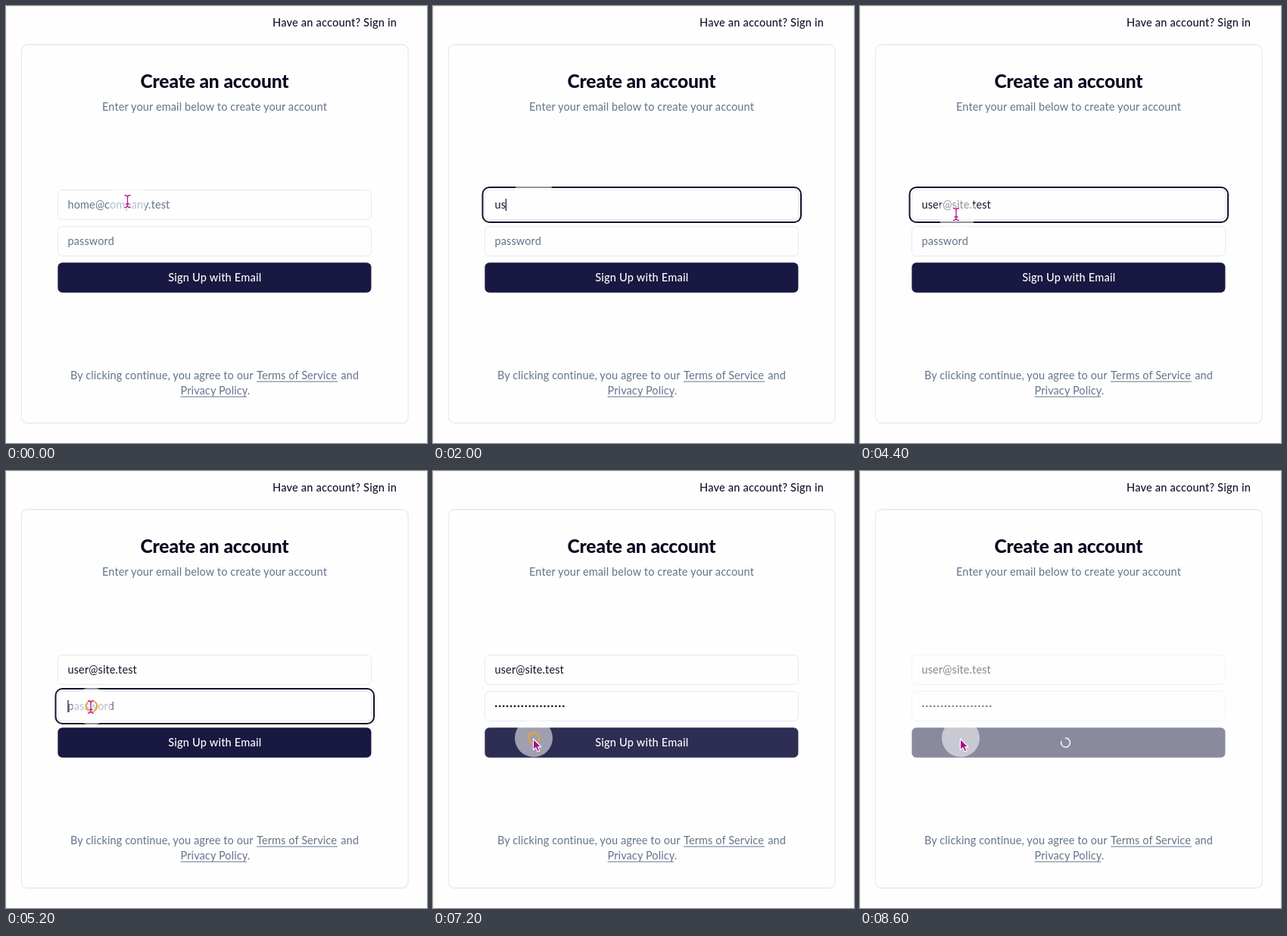
An HTML page that plays this animation: 556 by 576 pixels, repeating every 8.8 s.

```html
<!DOCTYPE html>
<html lang="en">
<head>
<meta charset="utf-8">
<title>Create an account</title>
<style>
  html, body { margin: 0; width: 100%; height: 100%; overflow: hidden; background: #fefefe; }
  svg { display: block; width: 556px; height: 576px; }
  text { font: 14.5px Lato, "Open Sans", sans-serif; letter-spacing: .12px; fill: #11142c; white-space: pre; }
  .title { font-size: 24.5px; font-weight: 800; letter-spacing: -.1px; fill: #060820; }
  .medium { font-weight: 500; letter-spacing: .22px; }
  .muted text, text.muted { fill: #64748b; }
  .legal text { letter-spacing: .1px; }
  .legal path { stroke: #64748b; }
  .mid { text-anchor: middle; }
  .box { fill: none; stroke: #e4e8f1; }
  .line { fill: none; stroke-linecap: round; stroke-linejoin: round; }
</style>
</head>
<body>
<svg viewBox="0 0 556 576">
  <rect width="556" height="576" fill="#fefefe"/>
  <path d="M.5 576V.5H556" fill="none" stroke="#fcefe7"/>
  <path d="M555.5 0V576" stroke="#f6f4f3"/>
  <text class="medium" x="516" y="26.5" text-anchor="end">Have an account? Sign in</text>

  <rect x="20.5" y="51.5" width="511" height="499" rx="8" fill="none" stroke="#f3f4f7"/>
  <rect class="box" x="20.5" y="50.5" width="510.5" height="499" rx="8"/>
  <text class="title mid" x="275.5" y="108">Create an account</text>
  <text class="muted mid" x="275.5" y="137.5">Enter your email below to create your account</text>

  <g id="fields">
    <rect class="box" x="68.5" y="242.5" width="414" height="39" rx="6"/>
    <rect class="box" x="68.5" y="290.5" width="414" height="39" rx="6"/>
    <text id="email" x="81.5" y="267"></text>
    <text id="hint" class="muted" x="81.5" y="315">password</text>
    <g id="dots" fill="#11142c"></g>
  </g>
  <rect id="focus" x="65.5" width="420.5" height="46" rx="9" fill="none" stroke="#11142b" stroke-width="2"/>
  <path id="caret" d="M0 -8V8" stroke="#11142c" stroke-width="1.2"/>

  <rect id="button" x="68.4" y="338.2" width="414" height="39.6" rx="6" fill="#181842"/>
  <text id="label" class="medium mid" x="275.8" y="362.5" style="fill:#fff">Sign Up with Email</text>
  <path id="spinner" class="line" d="M6 0A6 6 0 1 1 1.85 -5.7" stroke="#fff" stroke-width="1.4"/>

  <g class="muted legal">
    <text x="85" y="492">By clicking continue, you agree to our</text>
    <text x="331" y="492">Terms of Service</text>
    <text x="466" y="492" text-anchor="end">and</text>
    <text x="230.5" y="511.5">Privacy Policy.</text>
    <path d="M331 495H438M230.5 515H318"/>
  </g>

  <g id="mouse">
    <circle r="25" fill="#fff" opacity=".54"/>
    <circle id="click" r="7.3" fill="none" stroke="#f0a22c" stroke-width="2"/>
    <g id="beam" class="line" transform="translate(-1 1)">
      <path d="M-3.5 -8Q0 -8 0 -5Q0 -8 3.5 -8M0 -5V5M-3.5 8Q0 8 0 5Q0 8 3.5 8M-2 3.5H2" stroke="#fff" stroke-width="3" opacity=".8"/>
      <path d="M-3.5 -8Q0 -8 0 -5Q0 -8 3.5 -8M0 -5V5M-3.5 8Q0 8 0 5Q0 8 3.5 8M-2 3.5H2" stroke="#b3158f" stroke-width="1.3"/>
    </g>
    <path id="arrow" d="M0 0V15.5L3.5 12.3L6 18L8.8 16.8L6.4 11.2H11Z" transform="translate(-.5 1) scale(.95)" fill="#a80f86" stroke="#fff" stroke-width="1.2" stroke-linejoin="round"/>
  </g>
</svg>
<script>
const LOOP = 8800, TICK = 200;
const ADDRESS = 'user@site.test', PLACEHOLDER = 'home@company.test';

// [time, characters typed]
const EMAIL = [[0, 0], [1600, 1], [2000, 2], [2200, 3], [2400, 4], [2800, 6], [3000, 8], [3200, 9], [3600, 11], [3800, 14]];
const SECRET = [[0, 0], [5600, 2], [5800, 6], [6000, 11], [6200, 16], [6400, 19]];
// [time, x, y]
const PATH = [
  [0, 161.5, 256.5], [200, 149, 252], [400, 138, 248], [600, 133, 246], [4200, 133, 246],
  [4400, 128, 273.5], [4600, 123, 291], [4800, 117, 303], [5000, 113.5, 309], [5200, 113, 310],
  [6200, 113, 310], [6400, 127.5, 328.5], [6600, 127.5, 328.5], [6800, 131, 342], [7000, 133, 352]
];

const $ = id => document.getElementById(id);
const show = (id, on) => $(id).setAttribute('visibility', on ? 'visible' : 'hidden');
const within = (t, from, to) => t >= from && t < to;
const latest = (steps, t) => steps.filter(s => s[0] <= t).pop();

function position(t) {
  const a = latest(PATH, t);
  const b = PATH[PATH.indexOf(a) + 1] || a;
  const k = a === b ? 0 : (t - a[0]) / (b[0] - a[0]);
  return [a[1] + (b[1] - a[1]) * k, a[2] + (b[2] - a[2]) * k];
}

const dots = Array.from({ length: 19 }, (_, i) => {
  const dot = document.createElementNS('http://www.w3.org/2000/svg', 'circle');
  dot.setAttribute('cx', 83.3 + 4.94 * i);
  dot.setAttribute('cy', 310);
  dot.setAttribute('r', 1.35);
  return $('dots').appendChild(dot);
});

function render(t) {
  const typed = latest(EMAIL, t)[1], secret = latest(SECRET, t)[1];
  const first = within(t, 800, 5200), second = within(t, 5200, 7200);
  const loading = t >= 7600;
  const [x, y] = position(t);
  const hover = y > 338;

  const email = $('email');
  email.textContent = typed ? ADDRESS.slice(0, typed) : PLACEHOLDER;
  email.setAttribute('class', typed ? '' : 'muted');
  show('hint', !secret);
  dots.forEach((dot, i) => dot.setAttribute('visibility', i < secret ? 'visible' : 'hidden'));
  $('fields').setAttribute('opacity', loading ? .5 : 1);

  show('focus', first || second);
  $('focus').setAttribute('y', first ? 239 : 287);
  show('caret', (first && t < 4400) || second);
  const caretX = first
    ? (typed ? 81.8 + email.getComputedTextLength() : 82)
    : (secret ? 81.5 + 4.94 * secret : 82);
  $('caret').setAttribute('transform', `translate(${caretX} ${first ? 262 : 310})`);

  $('button').setAttribute('opacity', loading ? .5 : hover ? .9 : 1);
  show('label', !loading);
  show('spinner', loading);
  $('spinner').setAttribute('transform', `translate(271.5 358) rotate(${(t - 7850) * .36})`);

  const typing = within(t, 1600, 4400) || within(t, 5600, 6400);
  $('mouse').setAttribute('transform', `translate(${x} ${y})`);
  show('beam', !hover && !typing);
  show('arrow', hover);
  show('click', within(t, 800, 1200) || within(t, 5200, 5400) || within(t, 7200, 7400));
}

const start = performance.now();
let shown = -1;
function frame() {
  const t = Math.floor(((performance.now() - start) % LOOP) / TICK) * TICK;
  if (t !== shown) render(shown = t);
  requestAnimationFrame(frame);
}
frame();
</script>
</body>
</html>
```
